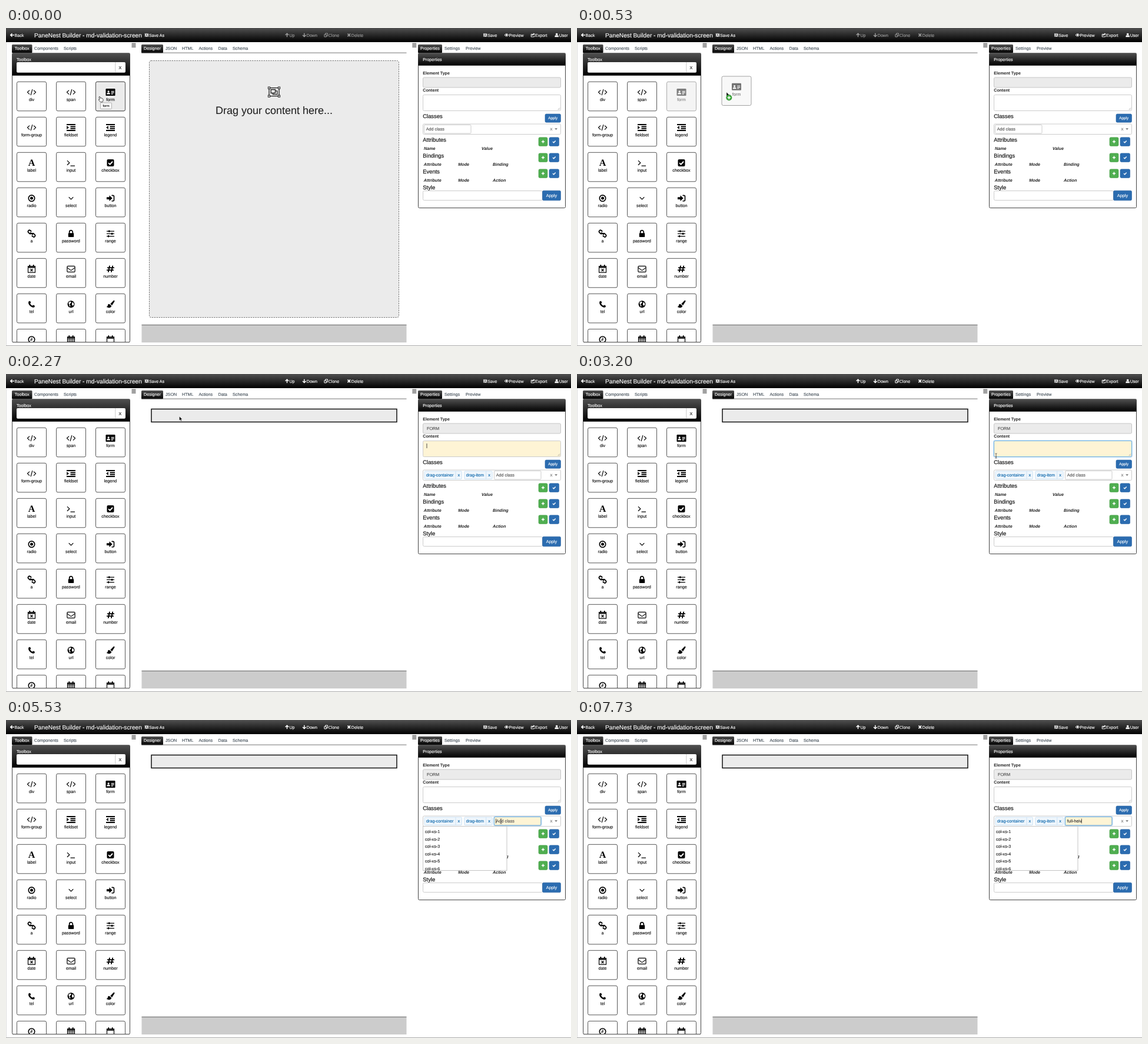
An HTML page for the animation above (8 s loop, 960x540 px).

```html
<!DOCTYPE html>
<html lang="en">
<head>
<meta charset="utf-8">
<title>Page designer</title>
<style>
html, body { margin: 0; width: 100%; height: 100%; overflow: hidden; background: #fff; }
svg { display: block; width: 100vw; height: 100vh; }
text { font-family: "Liberation Sans", Arial, sans-serif; text-rendering: geometricPrecision; white-space: pre; }
</style>
</head>
<body>
<svg id="stage" viewBox="0 0 960 540" xmlns="http://www.w3.org/2000/svg">
  <defs>
    <linearGradient id="bar" x2="0" y2="1">
      <stop offset="0" stop-color="#505050"/><stop offset="1" stop-color="#000"/>
    </linearGradient>
    <clipPath id="toolClip"><rect x="10" y="82" width="201" height="451.5"/></clipPath>
    <clipPath id="listClip"><rect x="709" y="181" width="142" height="74"/></clipPath>
  </defs>
  <g id="fixed"></g>
  <g id="live"></g>
</svg>
<script>
const LOOP = 8000, TICK = 1000 / 15, SIZE = 7.2;
const BLUE = '#2b6cb0', GREEN = '#4fae50', YELLOW = '#fef4d5', FRAME = '#444';

// Drawing helpers
const rect = (x, y, w, h, fill, stroke = 'none', rx = 0, more = '') =>
  `<rect x="${x}" y="${y}" width="${w}" height="${h}" rx="${rx}" fill="${fill}" stroke="${stroke}" ${more}/>`;
const line = (d, w = 1.3, c = 'currentColor', more = '') =>
  `<path d="${d}" fill="none" stroke="${c}" stroke-width="${w}" ${more}/>`;
const solid = (d, c = 'currentColor') => `<path d="${d}" fill="${c}"/>`;
const disc = (x, y, r, c = 'currentColor') => `<circle cx="${x}" cy="${y}" r="${r}" fill="${c}"/>`;
const ring = (r, w) => `<circle r="${r}" fill="none" stroke="currentColor" stroke-width="${w}"/>`;
const text = (x, y, s, c = '#222', size = SIZE, more = '', heavy = .15) =>
  `<text x="${x}" y="${y}" font-size="${size}" fill="${c}" stroke="${c}" stroke-width="${heavy}" ${more}>${s}</text>`;
const at = (x, y, body, c = '#000') => `<g transform="translate(${x} ${y})" color="${c}">${body}</g>`;
const BOLD = 'font-weight="700"', ITALIC = BOLD + ' font-style="italic"', MID = 'text-anchor="middle"';

const calendar = inner =>
  line('M-6-4.5H6V6H-6Z', 1.2) + line('M-6-2.7H6', 2) + line('M-3.2-7V-3.5M3.2-7V-3.5', 1.9) + inner;
const bars = line('M-7.5-5H7.5M-1-1.7H7.5M-1 1.7H7.5M-7.5 5H7.5', 2);

const icons = {
  code: line('M-3.5-3.5L-7 0L-3.5 3.5M3.5-3.5L7 0L3.5 3.5M1.4-5L-1.4 5', 1.2),
  card: rect(-8, -6, 16, 12, 'currentColor', 'none', 1.2) + disc(-3.4, -1.2, 1.6, '#fff') +
    solid('M-6.3 3.4Q-6.3 .6-3.4 .6T-.5 3.4Z', '#fff') + line('M1.2-1.5H6.2M1.2 .8H6.2M1.2 3H4.2', 1.1, '#fff'),
  indent: bars + solid('M-7.3-3L-3.5 0L-7.3 3Z'),
  outdent: bars + solid('M-3.6-3L-7.4 0L-3.6 3Z'),
  letter: `<text y="5.2" font-size="16" font-weight="700" text-anchor="middle" style="font-family:'Liberation Serif',serif">A</text>`,
  prompt: line('M-6.5-4L-2.7-.2L-6.5 3.6M-1 5H6.5', 1.3),
  check: rect(-6, -6, 12, 12, 'currentColor', 'none', 2) + line('M-3.4 0L-.9 2.5L3.6-2.3', 2, '#fff'),
  radio: ring(5.2, 1.7) + disc(0, 0, 2.5),
  chevron: line('M-3.8-1.9L0 1.9L3.8-1.9', 1.2),
  enter: solid('M-6.5-1.8H-2V-4.8L3.2 0L-2 4.8V1.8H-6.5Z') + line('M2-4.7H4.2Q6-4.7 6-3V3Q6 4.7 4.2 4.7H2', 1.6),
  link: '<g transform="rotate(43)">' + line('M-2.5-2.3H-5Q-7.3-2.3-7.3 0T-5 2.3H-3Q-.8 2.3-.8 0M2.5 2.3H5Q7.3 2.3 7.3 0T5-2.3H3Q.8-2.3 .8 0M-3 0H3', 1.8) + '</g>',
  lock: rect(-4.7, -.8, 9.4, 6.8, 'currentColor', 'none', .8) + line('M-2.8 0V-2.6A2.8 2.8 0 0 1 2.8-2.6V0', 1.7),
  sliders: line('M-6.5-4H6.5M-6.5 .3H6.5M-6.5 4.6H6.5', 1.2) + line('M-2.2-5.6V-2.4M2.6-1.3V1.9M-3.4 3V6.2', 2.2),
  dateX: calendar(line('M-1.9 .2L1.9 4M1.9 .2L-1.9 4', 1.3)),
  grid: calendar(line('M-6 .3H6M-6 3H6M-3-2V6M0-2V6M3-2V6', .8)),
  blank: calendar(''),
  mail: rect(-6.6, -4.7, 13.2, 10, 'none', 'currentColor', 1.4, 'stroke-width="1.2"') + line('M-6.4-2.2L-1 2Q0 2.6 1 2L6.4-2.2', 1.2),
  hash: line('M-1.4-5.5L-3.8 5.5M3.8-5.5L1.4 5.5M-5.4-2H6.4M-6.4 2H5.4', 1.9),
  phone: solid('M-5-4.8L-2.6-5.5L-1.1-2.6L-2.6-1.3Q-1.4 1.3 1.3 2.6L2.6 1.1L5.5 2.6L4.8 5Q3 6.2 0 4.6Q-4.6 2-5.5-2Z'),
  globe: disc(0, 0, 6) + solid('M-4.3-2.6L-1.5-4.8L.4-3.6L-1-1.4L-2.6 .2L-1 2.2L-2 4.6Q-4-1-4.3-2.6ZM2-3.5L4.2-2.4L5 .6L3 2.6L1.4 .6Z', '#fff'),
  brush: solid('M6.2-6.6Q7.6-6 6.8-4.6L2.6 2L-.2-.6L5-6.1ZM-1.2 .2L1.8 3Q1 6-2.2 6Q-5 6.2-7 4Q-4.6 4-4-.2Q-2.4-.8-1.2 .2Z'),
  clock: ring(5.3, 1.6) + line('M.4-3.3V.8H-2.6', 1.2),
  arrow: line('M3.3 0H-2.4M0-2.8L-2.8 0L0 2.8', 1.5),
  floppy: solid('M-3-3H2L3-2V3H-3Z') + line('M-1.4-3V-1.2H1.2V-3M-1.6 3V.8H1.6V3', .8, '#222'),
  copy: line('M-2.8-1H.6V3H-2.8ZM-1-1V-3H2.8V1.6H.6', 1),
  cross: line('M-2.3-2.3L2.3 2.3M2.3-2.3L-2.3 2.3', 1.7),
  eye: line('M-3.5 0Q0-4.4 3.5 0Q0 4.2-3.5 0Z', .9) + disc(0, -.2, 1.5),
  out: line('M1.2-1.4H-2.8V3H2.6V1', .9) + line('M-1.2 1.2Q-.8-1.4 2-1.8', 1.2) + solid('M1.2-3.6L3.8-1.7L1.2 .2Z'),
  person: disc(0, -1.5, 1.8) + solid('M-3.3 3.3Q-3.5 .3-1.3 .2Q0 1 1.3 .2Q3.5 .3 3.3 3.3Z'),
  group: line('M-8.5-7H8.5V7H-8.5Z', 1.3) + line('M-5.3-4.2H2V1.8H-5.3ZM2-1.8H5.3V4.2H-2V1.8', 1.3) +
    [[-8.5, -7], [8.5, -7], [-8.5, 7], [8.5, 7]].map(([x, y]) => rect(x - 1.6, y - 1.6, 3.2, 3.2, '#ebebeb', 'currentColor')).join('')
};

const tools = 'div:code span:code form:card form-group:code fieldset:indent legend:outdent label:letter input:prompt checkbox:check radio:radio select:chevron button:enter a:link password:lock range:sliders date:dateX email:mail number:hash tel:phone url:globe color:brush time:clock week:grid month:blank'
  .split(' ').map(s => s.split(':'));

const tile = (x, y, [label, icon], fill = '#fff') =>
  rect(x, y, 50, 49.5, fill, FRAME, 2.5, 'stroke-width=".9"') + at(x + 25, y + 17.8, icons[icon]) +
  text(x + 25, y + 32.8, label, '#111', SIZE, MID);
const action = (x, icon, label, c = '#fff', turn = 0) =>
  at(x, 12, `<g transform="rotate(${turn})">${icons[icon]}</g>`, c) + text(x + 4, 14.5, label, c, 7.1);
const tab = (x, w, label) => rect(x, 28, w, 14.5, 'url(#bar)', 'none', 1.5) + text(x + w / 2, 37.4, label, '#fff', SIZE, MID);
const tabLink = (x, label) => text(x, 37.4, label, '#45505a');
const menu = x => line(`M${x} 26.3h7m-7 2h7m-7 2h7m-7 2h7`, 1, FRAME);
const button = (x, y, w, h, label, size) =>
  rect(x, y, w, h, BLUE, '#245f9e', 2, 'stroke-width=".6"') + text(x + w / 2, y + h / 2 + 2.3, label, '#fff', size, MID);
const heading = (y, title) => text(708.3, y, title, '#222', 9.4, '', .25);
const section = (y, title, ...cols) =>
  heading(y, title) +
  rect(905, y - 7.3, 15, 14.6, GREEN, '#449d44', 2, 'stroke-width=".6"') + line(`M910 ${y}h5m-2.5-2.5v5`, 1.5, '#fff') +
  rect(923, y - 7.3, 16.6, 14.6, BLUE, '#245f9e', 2, 'stroke-width=".6"') + line(`M929 ${y}l1.7 1.7 3-3.2`, 1.4, '#fff') +
  cols.map(([x, s]) => text(x, y + 14.1, s, '#222', SIZE, ITALIC, 0)).join('');

function drawFixed() {
  const top = rect(0, 0, 960, 24, 'url(#bar)') +
    action(10.5, 'arrow', 'Back') + text(48, 15.5, 'PaneNest Builder - md-validation-screen', '#fff', 10.2) +
    action(239, 'floppy', 'Save As') + action(814.3, 'floppy', 'Save') + action(850.5, 'eye', 'Preview') +
    action(895, 'out', 'Export') + action(935.7, 'person', 'User');
  const left = tab(10, 34.5, 'Toolbox') + tabLink(48, 'Components') + tabLink(98, 'Scripts') + menu(213.5) +
    rect(10.5, 43, 200, 490.5, '#fff', FRAME, 2) + rect(10.5, 42.5, 200, 38.3, 'url(#bar)') +
    text(18, 55.7, 'Toolbox', '#fff') + rect(18, 58, 185, 17.8, '#fff', 'none', 2) +
    line('M185.8 58V75.8', .8, '#bbb') + text(193.8, 69.5, 'X', '#222', 7.2, MID) +
    '<g clip-path="url(#toolClip)">' +
    tools.map((tool, i) => tile(18.5 + i % 3 * 67, 91.3 + Math.floor(i / 3) * 60, tool)).join('') + '</g>' +
    line('M11 533.5H210', 1, FRAME);
  const center = tab(230, 37, 'Designer') + line('M230 42.2H680.5', .9, '#666') +
    tabLink(271, 'JSON') + tabLink(299, 'HTML') + tabLink(327.5, 'Actions') + tabLink(360.5, 'Data') + tabLink(385, 'Schema') +
    menu(690.3) + rect(230.5, 504, 450, 30, '#ccc') + line('M230.5 504.2H680.5', .9, '#555');
  const right = tab(700, 41, 'Properties') + tabLink(745, 'Settings') + tabLink(781, 'Preview') +
    rect(700.5, 43, 250, 262.5, '#fff', FRAME, 2) + rect(700.5, 42.5, 250, 21.3, 'url(#bar)') +
    text(708.3, 56, 'Properties', '#fff', 7.1) +
    text(708.3, 79, 'Element Type', '#222', 7.1, BOLD, 0) + rect(708.5, 84, 234, 17, '#ebebeb', '#c6c6c6', 2) +
    text(708.3, 108.4, 'Content', '#222', 7.1, BOLD, 0) +
    heading(153.1, 'Classes') + button(916, 146, 26.5, 14.2, 'Apply', 6.3) +
    rect(708.5, 163, 234, 17.5, '#fff', '#ccc', 2) +
    text(926.5, 174.3, 'x', '#777', 8, MID) + solid('M932.2 170.3h4.8l-2.4 2.6z', '#777') +
    section(193.1, 'Attributes', [710, 'Name'], [808, 'Value']) +
    section(220.1, 'Bindings', [709.7, 'Attribute'], [768.3, 'Mode'], [827, 'Binding']) +
    section(247.1, 'Events', [709.7, 'Attribute'], [768.3, 'Mode'], [827, 'Action']) +
    heading(274.1, 'Style') + rect(708.5, 276.5, 203, 16, '#fff', '#ccc', 2) +
    button(911.5, 276.2, 31, 16.6, 'Apply', 7.3);
  document.getElementById('fixed').innerHTML = rect(0, 0, 960, 540, '#fff') + top + left + center + right +
    line('M0 539.6H960', .8, '#888') + line('M.3 24V540', .6, '#bbb');
}

// Pointer path: tick, x, y, easing into the point
const inOut = u => u * u * (3 - 2 * u), out = u => 1 - (1 - u) ** 2, flat = u => u;
const path = [
  [4, 160, 117.5], [8, 254, 109, flat], [13, 285, 110, out], [22, 285, 110, flat], [29, 294.5, 72, inOut],
  [38, 294.5, 72, flat], [48, 712, 139, inOut], [50, 714.5, 144, out], [53, 714.5, 144, flat],
  [58, 768, 168, inOut], [64, 841, 172, out]
];
function pointer(n) {
  const i = path.findIndex(p => p[0] >= n);
  if (i < 1) return (i ? path[path.length - 1] : path[0]).slice(1, 3);
  const [a, ax, ay] = path[i - 1], [b, bx, by, ease] = path[i];
  const k = ease((n - a) / (b - a));
  return [ax + (bx - ax) * k, ay + (by - ay) * k];
}

const typed = 'full-heiv', strokes = [91, 94, 97, 99, 103, 109, 111, 113, 116];
const pen = document.createElement('canvas').getContext('2d');
pen.font = '72px "Liberation Sans", Arial, sans-serif';
const widthOf = s => pen.measureText(s).width * SIZE / 72;
const within = (v, a, b) => v >= a && v < b;

const cursors = {
  hand: `<path d="M-2-.5Q-1-2 0-.3L.6 2L.8 1.2Q2 .6 2.3 1.8Q3.6 1.4 3.8 2.6Q5 2.4 5 4V5.6L4 8.2H.4L-2.6 4.6Q-2.6 3.2-1 4Z" fill="#fff" stroke="#222" stroke-width=".8"/>`,
  arrow: `<path d="M0 0V7L1.7 5.6L2.8 8L4 7.4L2.9 5.1H5Z" fill="#000" stroke="#fff" stroke-width=".4"/>`,
  beam: line('M-1.6-4.2Q0-4.2 0-3Q0-4.2 1.6-4.2M0-3V3M-1.6 4.2Q0 4.2 0 3Q0 4.2 1.6 4.2M-1 1.2H1', .9, '#555')
};

function drawDesigner(n) {
  if (n < 8) return rect(243.5, 55.5, 424, 436, '#ebebeb', '#666', 3, 'stroke-width=".9" stroke-dasharray="2.4 1.5"') +
    at(455.5, 108.7, icons.group, '#222') + text(455.5, 145.5, 'Drag your content here...', '#222', 18, MID, .1);
  if (n < 18) return '';
  return n < 27
    ? rect(247, 59.5, 417, 22, '#ebebeb', '#666', 2, 'stroke-dasharray="2.4 1.5"')
    : rect(247, 59.5, 417, 22, '#ebebeb', '#111', 0, 'stroke-width="1.5"');
}

function drawActions(n) {
  const c = n < 34 ? '#9a9a9a' : '#fff';
  return action(477.5, 'arrow', 'Up', c, 90) + action(506.8, 'arrow', 'Down', c, -90) +
    action(543.7, 'copy', 'Clone', c) + action(582.8, 'cross', 'Delete', c);
}

const glow = (x, y, w, h, k) => rect(x, y, w, h, 'none', '#5fa8e0', 2, `opacity="${k}"`) +
  rect(x - .8, y - .8, w + 1.6, h + 1.6, 'none', '#8cc4ee', 3, `stroke-width="2" opacity="${k * .35}"`);
const caret = (x, y) => line(`M${x} ${y}v8`, .8, '#222');
const tag = (x, w, label) => rect(x, 165, w, 13.5, '#eff6fc', '#c5def1', 1.5, 'stroke-width=".8"') +
  line(`M${x + w - 10.5} 165v13.5`, .8, '#c5def1') + text(x + 3, 174, label, '#0f69ad') +
  text(x + w - 5.2, 174, 'x', '#0f69ad', 7.5, MID);

function drawProperties(n) {
  const editing = within(n, 34, 68), listed = n >= 68;
  let s = rect(708.5, 113.5, 234, 27, editing ? YELLOW : '#fff', '#ccc', 2) + line('M937.5 139l3.5-3.5M939.5 139l1.5-1.5', .6, '#888');
  if (editing) s += glow(708.5, 113.5, 234, 27, Math.min(1, (n - 34) / 2));
  if (within(n, 34, 42) || within(n, 50, 58)) s += caret(715, 118);
  const x = n < 34 ? 710.5 : 829.5;
  s += rect(x, 164.5, 79.5, 14.5, listed ? YELLOW : '#fff', '#ccc', 1.5);
  if (n >= 34) s += text(715, 95, 'FORM', '#555') + tag(711, 63.5, 'drag-container') + tag(778.7, 47.5, 'drag-item');
  if (listed) s += glow(x, 164.5, 79.5, 14.5, n < 69 ? .5 : 1);
  const value = typed.slice(0, strokes.filter(k => k <= n).length);
  s += text(x + 3.3, 174, value || 'Add class', value ? '#333' : '#555');
  if (value || within(n, 68, 75) || within(n, 83, 90)) s += caret(x + 3 + widthOf(value), 167.5);
  if (listed) {
    s += rect(708.5, 180.5, 142.5, 75, '#fff', '#c4c4c4') + '<g clip-path="url(#listClip)">';
    for (let i = 0; i < 6; i++) s += text(712, 192 + i * 12.5, 'col-xs-' + (i + 1));
    s += '</g>';
  }
  return s;
}

function drawDrag(n) {
  const [x, y] = pointer(n), form = tools[2];
  let s = '';
  if (n < 5) s += tile(152.5, 91.3, form, '#ebebeb');
  else if (n < 18) s += rect(151, 90, 53, 53, '#fff') + `<g opacity=".5">${tile(152.5, 91.3, form, '#ebebeb')}</g>`;
  if (within(n, 5, 17)) s += `<g opacity=".55">${tile(x - 8, y - 27, form, '#f3f3f3')}</g>`;
  if (n < 2) s += rect(160.5, 127, 19, 10.5, '#f7f7f7', '#999', 1, 'stroke-width=".7"') + text(170, 134.2, 'form', '#222', 5.6, MID);
  if (n >= 91) return s;
  const overField = within(x, 708, 943) && within(y, 113, 141) || within(x, 829, 909) && within(y, 164, 180);
  s += at(x, y, cursors[n < 5 ? 'hand' : overField ? 'beam' : 'arrow']);
  if (within(n, 5, 18) && x > 230)
    s += at(x + 4.3, y + 9.3, disc(0, 0, 5, '#2f8f2f') + disc(0, 0, 4.2, '#45ad45') + line('M-2.6 0H2.6M0-2.6V2.6', 1.4, '#fff'));
  return s;
}

const live = document.getElementById('live');
let shown = -1;
function update(ms) {
  const n = Math.floor((ms % LOOP + 4) / TICK) % 120;
  if (n === shown) return;
  shown = n;
  live.innerHTML = drawActions(n) + drawDesigner(n) + drawProperties(n) + drawDrag(n);
}

drawFixed();
update(0);
const start = performance.now();
(function loop() {
  update(performance.now() - start);
  requestAnimationFrame(loop);
})();
</script>
</body>
</html>
```
